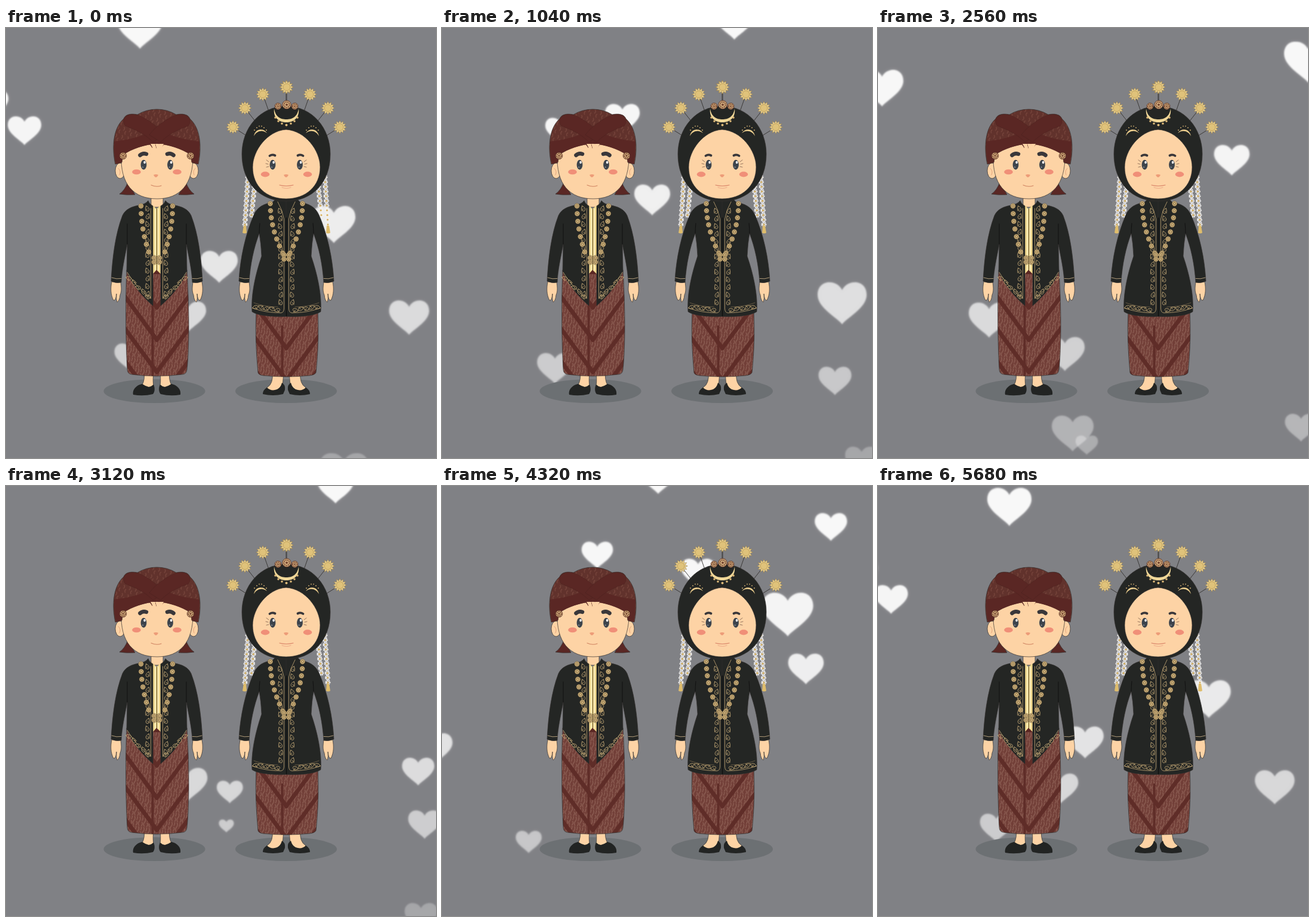
Animation of 720 by 720 pixels, one loop 5.76 s. Source, as an HTML page:

```html
<!DOCTYPE html>
<html lang="en">
<head>
<meta charset="utf-8">
<title>Couple with hearts</title>
<style>
html, body { margin: 0; width: 100%; height: 100%; overflow: hidden; background: #808185; }
svg { display: block; width: 100vw; height: 100vh; }
#hearts { fill: #fbfbfb; filter: blur(1.3px) drop-shadow(0 0 3px rgba(255,255,255,.2)); }
</style>
</head>
<body>
<svg id="stage" viewBox="0 0 720 720" xmlns="http://www.w3.org/2000/svg">
  <defs>
    <pattern id="batik" width="9" height="16" patternUnits="userSpaceOnUse" patternTransform="rotate(9)">
      <rect width="9" height="16" fill="#723f38"/>
      <path d="M2 0q3 4 0 8q-2 4 1 7M6.5 8q3 3 0 7M6.5-1q2 3 0 7" fill="none" stroke="#8f6156" stroke-width="1.3"/>
    </pattern>
    <pattern id="cloth" width="10" height="14" patternUnits="userSpaceOnUse" patternTransform="rotate(14)">
      <rect width="10" height="14" fill="#61322c"/>
      <path d="M2 1q3 3 0 6M7 7q-3 3 0 6" fill="none" stroke="#7c493f" stroke-width="1.1"/>
    </pattern>
  </defs>
  <g id="hearts"></g>
  <g id="people"></g>
</svg>
<script>
const STEP = 80, COUNT = 72;
const SKIN = '#fdd3a5', BLACK = '#242624', GOLD = '#d3b67e', MAROON = '#5a2724', INK = '#33302e';
const MAN = 252.5, WOMAN = 469.5;

const $ = id => document.getElementById(id);
const path = (d, fill, more = '') => `<path d="${d}" fill="${fill}" ${more}/>`;
const line = (d, color, w = 1) => path(d, 'none', `stroke="${color}" stroke-width="${w}" stroke-linecap="round"`);
const oval = (x, y, rx, ry, fill, more = '') =>
  `<ellipse cx="${x}" cy="${y}" rx="${rx}" ry="${ry}" fill="${fill}" ${more}/>`;
const dot = (x, y, r, fill, more) => oval(x, y, r, r, fill, more);
const both = (cx, s) => s + `<g transform="matrix(-1 0 0 1 ${2 * cx} 0)">${s}</g>`;
const many = (n, f) => Array.from({ length: n }, (_, i) => f(i, n > 1 ? i / (n - 1) : 0)).join('');
const thin = `stroke="${INK}" stroke-width=".7"`;

// ---- ornaments ----
const bead = (x, y, r = 4.2) =>
  dot(x, y, r, GOLD, 'stroke="#5f4f38" stroke-width=".6"') +
  dot(x, y, r * .5, 'none', 'stroke="#6b5738" stroke-width=".8"');

const rose = (x, y, r) =>
  dot(x, y, r, '#c9a476', 'stroke="#552b22" stroke-width=".8"') +
  dot(x, y, r * .65, 'none', 'stroke="#71402f" stroke-width="1.5" stroke-dasharray="2 1.2"') +
  dot(x, y, r * .25, '#71402f');

const daisy = (x, y) =>
  dot(x, y, 2.9, 'none', 'stroke="#f3f1ee" stroke-width="3" stroke-dasharray="1.9 .7"') +
  dot(x, y, 1.5, '#d8b15c');

function sun(x, y) {
  const pts = many(24, i => {
    const a = i * Math.PI / 12, r = i % 2 ? 7.5 : 11.3;
    return `${(x + r * Math.sin(a)).toFixed(1)},${(y - r * Math.cos(a)).toFixed(1)} `;
  });
  return `<polygon points="${pts}" fill="#e6cd8b" stroke="#8c7546" stroke-width=".5"/>` +
    dot(x, y, 6, '#dfc27a', 'stroke="#b08f4b" stroke-width=".7"');
}

// row of small scrolls along a straight line
function scrolls(x1, y1, x2, y2, n) {
  const turn = Math.atan2(y2 - y1, x2 - x1) * 180 / Math.PI;
  return many(n, (i, p) => {
    const at = `translate(${x1 + (x2 - x1) * p} ${y1 + (y2 - y1) * p}) rotate(${turn}) scale(1 ${i % 2 ? -1 : 1})`;
    return `<g transform="${at}">` +
      line('M-5 2.5C-3-4 4-4 3.5 0C3 3-.5 2.5 0 0M-5 2.5Q-1 4 3 3', '#c3a877', .9) + '</g>';
  });
}

function skirt(id, shape, cx, top) {
  const bands = many(4, i => {
    const y = top + i * 54 - 40;
    return line(`M${cx - 56} ${y}L${cx} ${y + 76}`, '#5f2d28', 7);
  });
  return `<clipPath id="${id}"><path d="${shape}"/></clipPath><g clip-path="url(#${id})">` +
    path(shape, 'url(#batik)') + both(cx, bands) +
    line(`M${cx - 7} ${top}V590`, '#5f2d28', 4) + '</g>' + path(shape, 'none', thin);
}

const hand = x => path(`M${x - 7} 425H${x + 8}C${x + 9} 434 ${x + 10} 440 ${x + 7} 447` +
  `Q${x + 6} 457 ${x + 2} 459Q${x} 454 ${x + 1} 445Q${x} 457 ${x - 4} 456C${x - 9} 446 ${x - 9} 436 ${x - 7} 425Z`, SKIN, thin);

const eye = (x, y) => oval(x, y, 4.9, 8.2, '#3d444c') + oval(x + 1.6, y - 4, 1.8, 2.2, '#fff') +
  dot(x - 1.4, y + 4, .9, '#9aa3ab');

const nose = x => path(`M${x - 4} 246Q${x} 244 ${x + 4} 246Q${x + 2} 250 ${x} 250Q${x - 2} 250 ${x - 4} 246Z`, '#ed9c78');

function man() {
  const c = MAN;
  const legs = both(c, path('M231 576H247C246 588 246 592 247 599L238 604L228 598Q233 588 231 576Z', SKIN, thin) +
    path('M213 614C211 604 221 597 228 596Q234 600 239 601Q244 600 247 597C250 603 249 610 246 613Q230 617 213 614Z', '#222423'));
  const cloth = skirt('sarong', 'M202 405H303C307 470 307 535 303 572Q302 580 295 580Q252 586 210 580Q203 579 203 571C200 520 200 450 202 405Z', c, 432);

  const shirt = path('M243 282H263V300H243Z', SKIN, thin) +
    path('M246 297L252 303L259 297V412L252 406L246 412Z', '#f1d98c') +
    line('M250 303V406M255 303V406', '#fbf0c4', 1.5) + line('M252.5 303V406', '#5b4b2c', 1) +
    path('M246 412L252 405L259 412Z', MAROON);

  const half = path('M238 289Q240 295 246 298V465C229 450 211 430 202 408L203 362C198 388 194 405 193 426Q184 428 176 424C178 385 183 345 195 314C200 303 211 299 222 297Q234 295 238 289Z', BLACK, thin) +
    line('M203 362V328', '#111') +
    line('M177 418Q185 421 193 419.5', '#c0a983', .9) +
    line('M242.5 302V453C228 442 213 426 203 409', '#c3a877', .8) +
    scrolls(237, 303, 237, 446, 12) + scrolls(206, 419, 238, 450, 5) +
    many(7, (i, p) => bead(226 + 13 * p * p, 298 + 77 * p));
  const jacket = both(c, hand(184) + half) + bead(248, 385) + bead(257, 385) + bead(248, 392) + bead(257, 392);

  const sides = both(c,
    path('M204 258Q199 272 190 278Q201 280 216 279Z', MAROON, thin) +
    oval(191, 239, 8, 13, SKIN, thin) + line('M188 235Q193 239 190 246', '#e3a67d'));
  const face = path('M193 212C191 262 214 286 253 286C291 286 314 262 313 212C306 180 200 180 193 212Z', SKIN, thin);

  const hat = path('M183 228C177 200 179 168 197 152C200 144 210 143 220 145Q235 136 252.5 136Q270 136 285 145C295 143 305 144 308 152C326 168 328 200 322 228L311 225L310 212Q285 196 253 193Q220 196 196 212L194 225Z', 'url(#cloth)', thin) +
    both(c, path('M252.5 165C238 179 213 186 181 190Q181 214 184 228L194 225L196 212C211 203 232 195 252.5 194Z', MAROON)) +
    both(c, path('M197 153C201 143 217 143 226 148C240 155 255 165 265 179L246 191C233 177 213 169 200 164Q196 160 197 153Z', MAROON, 'stroke="#45201e" stroke-width=".4"')) +
    path('M240 194L245 201L249 193L252 202L256 193L260 201L265 194Z', MAROON) +
    path('M242 194L247 203L250 194L253 204L256 194L260 203L264 194Z', SKIN);

  const look = both(c, oval(218.5, 241, 7.3, 4.3, '#f08f78') + rose(196, 214, 5.8) +
    line('M224.5 213Q229 209 235 211', '#39373a', 6.5)) +
    eye(230.5, 229) + eye(275, 229) +
    nose(251) + line('M243 263Q252 267 260 264', '#cf8462', 1.1);
  return oval(248.5, 608, 85, 20, '#6c7073') + legs + cloth + shirt + jacket + sides + face + hat + look;
}

function woman() {
  const c = WOMAN;
  const legs = both(c, path('M446 576H465L463 600Q455 612 438 606L437 602Q448 596 446 576Z', SKIN, thin) +
    path('M430 613Q430 606 437 602Q444 609 454 605Q460 602 462 594Q468 597 467 606L464 613Q447 617 430 613Z', '#222423'));
  const cloth = skirt('kain', 'M419 472H522C524 515 522 550 519 577Q517 581 508 582Q470 586 431 582Q423 581 422 577C419 545 417 510 419 472Z', c, 500);

  const strands = both(c, many(11, i => daisy(405 - i * .5, 250 + i * 7.9)) +
    many(9, i => daisy(417.5 - i * .8, 250 + i * 7.9)) +
    path('M398 331H402L403 343Q400 345 396 343Z', '#dfbd6c'));

  const half = path('M452 286H470V483C446 484 422 482 412 475C410 448 417 414 428 382Q427 360 424 344C415 368 409 395 407 426Q399 428 390 424C392 385 401 345 415 313C421 299 433 294 446 292Z', BLACK, thin) +
    line('M424 344Q424 336 425 327', '#111') +
    line('M391 418Q399 421 407 419.5', '#c0a983', .9) +
    line('M455 291Q463 305 465.5 320V470Q465 477 460 477Q435 477 413 469', '#c3a877', .8) +
    line('M415 460Q433 467 455 467', '#8f7b58', .6) +
    scrolls(459, 307, 460, 460, 13) + scrolls(418, 467, 455, 472, 5) +
    many(8, (i, p) => bead(442.5 + 21 * p * p, 294 + 83 * p));
  const jacket = both(c, hand(399) + half) + line('M469.5 318V482', '#0e100f', 1.5) +
    bead(465.5, 380) + bead(473.5, 380) + bead(465.5, 387) + bead(473.5, 387);

  const crown = both(c, [[380, 166], [400, 134], [430, 111], [469, 99]].map(([x, y]) =>
    line(`M${x} ${y}L${x + (469 - x) * .3} ${y + (222 - y) * .3}`, '#34322f', .9) + sun(x, y)).join(''));
  const hood = path('M469 131C513 131 543 168 543 211C543 259 513 290 469 290C425 290 395 259 395 211C395 168 425 131 469 131Z', BLACK, thin) +
    path('M469 170C501 172 526 205 526 233C526 265 502 286 469 286C436 286 413 265 413 233C413 205 438 172 469 170Z', SKIN, thin);
  const jewels = path('M449 135C451 149 460 153 469.5 153C479 153 488 149 490 135C492 151 481 158 469.5 158C458 158 447 151 449 135Z', '#f0d798') +
    both(c, [[451, 150], [456, 156], [462, 160]].map(([x, y]) => dot(x, y, 1.8, '#dcb878')).join('') +
      path('M415 181C417 169 430 166 437 176C429 170 420 172 415 181Z', '#efd08f') +
      many(6, (i, p) => dot(416 + 20 * p, 171 - 7 * Math.sin(p * Math.PI), .9, '#dcb878')) +
      rose(455.5, 131, 5.4)) + dot(469.5, 162.5, 2, '#dcb878') + rose(470, 128.5, 7.2);

  const look = both(c, oval(434, 245, 7.3, 4.4, '#f08f78') +
    line('M441.5 214Q446 211 450.5 213.5', '#39373a', 3.8) +
    line('M440 224L436 221M439 228L435 227M440 232L436 233', '#7d5d4c', .8)) +
    eye(446.5, 229) + eye(492, 229) + nose(469) +
    line('M458 263Q469 266 481 263', '#d98468', 1.2) + line('M462 267Q470 270 477 267', '#eda786', 1);
  return oval(469, 608, 85, 20, '#6c7073') + legs + cloth + strands + jacket + crown + hood + jewels + look;
}

$('people').innerHTML = man() + woman();

// ---- hearts ----
const HEART = 'M0 43C-7 31-50 10-50-17C-50-35-38-43-26-43C-14-43-4-36 0-27C4-36 14-43 26-43C38-43 50-35 50-17C50 10 7 31 0 43Z';
const hearts = [];

// at step k: centre, width; then drift, rise, growth and bend per step
function heart(k, x, y, w, vx, vy, grow = 0, bend = 0) {
  const el = document.createElementNS('http://www.w3.org/2000/svg', 'path');
  el.setAttribute('d', HEART);
  $('hearts').append(el);
  hearts.push({ el, k, x, y, w, vx, vy, grow, bend });
}

heart(0, 549, 329, 72, -5, 27.8, -1.3);
heart(0, 357, 400, 62, 10.2, 29.5, 0, -.14);
heart(0, 306, 483, 58, -.3, 23.5, 0, -.15);
heart(0, 31, 172, 56, 9, 18);
heart(0, -24, 128, 56, 5, 19);
heart(0, 675, 485, 67, 10.7, 19.5, .6);
heart(13, 352, 288, 60, 11, 20.3, .4);
heart(13, 198, 172, 50, -4.2, 25.3);
heart(13, 670, 461, 82, 8, 22);
heart(13, 658, 591, 55, 9, 18);
heart(25, 74, 282, 67, -9.6, 25.2, .6, -.1);
heart(25, 633, 422, 58, -5.8, 27.4, .2, -.18);
heart(25, -24, 490, 50, -3, 22);
heart(32, 720, 57, 80, -4.4, 23.5);
heart(32, 186, 489, 68, 8, 22.7, -.6);
heart(32, 313, 546, 66, -9, 26.5, -.7);
heart(32, 326, 679, 70, -3, 25.6, -.8);
heart(46, 400, 336, 50, 3.6, 24.5, .9, .1);
heart(46, 672, 287, 54, -2.6, 27.3);
heart(46, 743, 378, 55, 6, 27);
heart(46, 655, 528, 57, -5.7, 27.7, .3);
heart(61, 677, 50, 113, 14, 23.6, 4);
heart(61, 12, 244, 60, 3.5, 28);
heart(71, 220, 35, 74, 4.4, 33, 1.8);

function frame() {
  const now = Math.floor(performance.now() / STEP) % COUNT;
  for (const h of hearts) {
    const d = (now - h.k + COUNT * 1.5) % COUNT - COUNT / 2;
    const x = h.x + h.vx * d, y = h.y - h.vy * d + h.bend * d * d;
    const w = Math.max(20, h.w + h.grow * d);
    const seen = y > -w && y < 720 + w && x > -w && x < 720 + w;
    h.el.style.display = seen ? '' : 'none';
    if (!seen) continue;
    const depth = Math.min(1, Math.max(0, y / 720));
    h.el.setAttribute('transform', `translate(${x.toFixed(1)} ${y.toFixed(1)}) scale(${(w / 100).toFixed(3)})`);
    h.el.setAttribute('opacity', (.97 - .7 * depth ** 2.4).toFixed(3));
  }
  requestAnimationFrame(frame);
}
frame();
</script>
</body>
</html>
```
